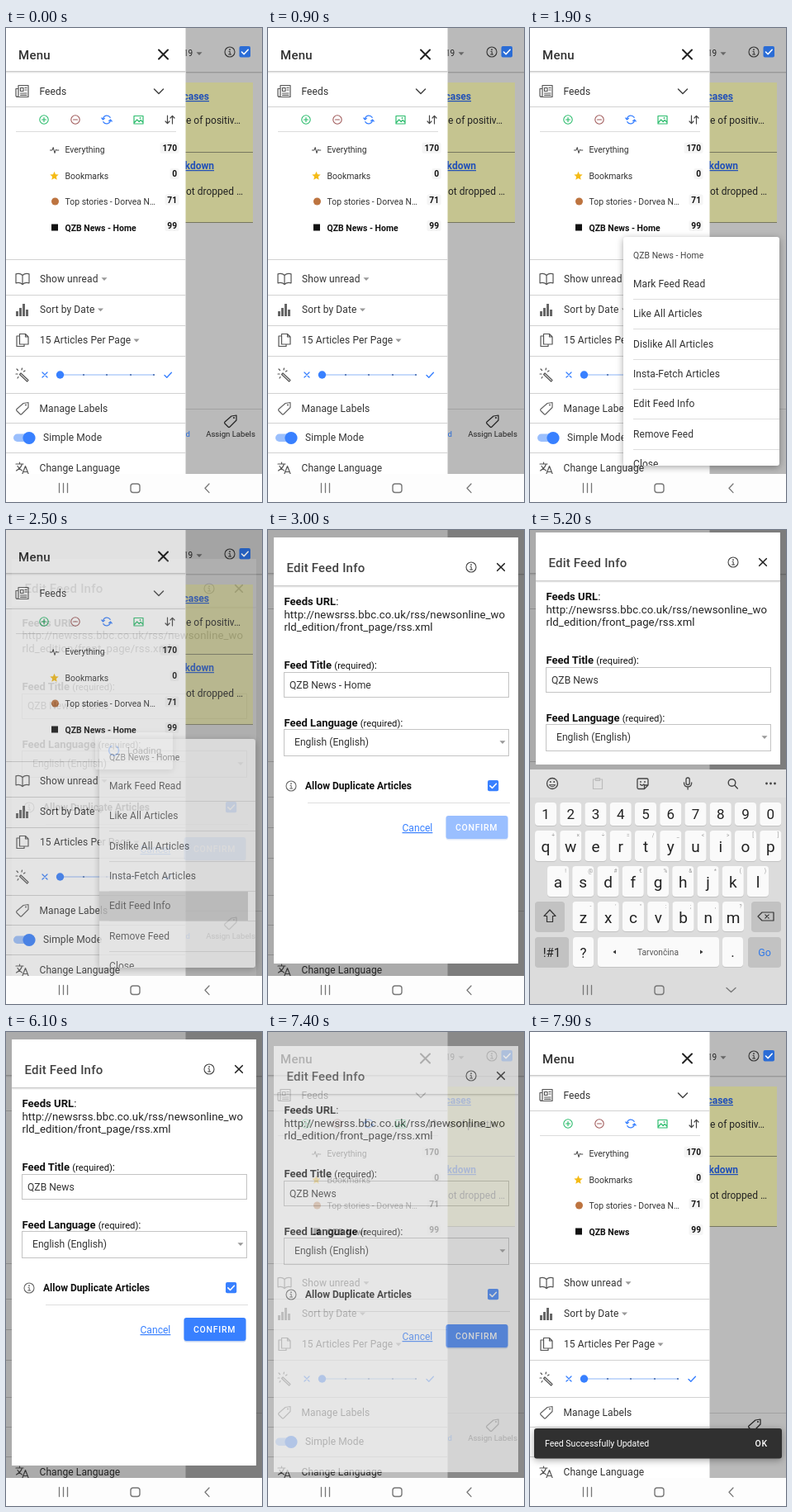
An HTML page that plays this animation: 310x574 px, repeating every 8 s.

```html
<!DOCTYPE html>
<html lang="en">
<head>
<meta charset="utf-8">
<title>Edit feed</title>
<style>
html, body { margin: 0; width: 100%; height: 100%; overflow: hidden; background: #fff; }
svg { display: block; width: 310px; height: 574px; }
text { font-family: Roboto, Arial, sans-serif; white-space: pre; }
#popup, #toast, #loading { filter: drop-shadow(0 2px 4px rgba(0, 0, 0, .35)); }
</style>
</head>
<body>
<svg id="stage" viewBox="0 0 310 574" xmlns="http://www.w3.org/2000/svg"></svg>
<script>
const LONG = 'QZB News - Home', SHORT = 'QZB News';
const BLUE = '#3880ff', INK = '#333';

// Drawing helpers
const text = (x, y, s, size = 12, fill = INK, more = '') =>
  `<text x="${x}" y="${y}" font-size="${size}" fill="${fill}" ${more}>${s}</text>`;
const rect = (x, y, w, h, fill, rx = 0, more = '') =>
  `<rect x="${x}" y="${y}" width="${w}" height="${h}" fill="${fill}" rx="${rx}" ${more}/>`;
const path = (d, stroke = '#555', w = 1.2, fill = 'none') =>
  `<path d="${d}" stroke="${stroke}" stroke-width="${w}" fill="${fill}" stroke-linecap="round" stroke-linejoin="round"/>`;
const dot = (x, y, r, fill, stroke = 'none', w = 1.1) =>
  `<circle cx="${x}" cy="${y}" r="${r}" fill="${fill}" stroke="${stroke}" stroke-width="${w}"/>`;
const rule = (x1, x2, y, c = '#d2d2d2') => rect(x1, y, x2 - x1, 1, c);
const cross = (x, y, r, c = '#222', w = 2) =>
  path(`M${x - r} ${y - r}L${x + r} ${y + r}M${x + r} ${y - r}L${x - r} ${y + r}`, c, w);
const caret = (x, y, c = '#999') => path(`M${x - 3.5} ${y - 1.8}h7l-3.5 3.8z`, 'none', 0, c);
const group = (id, body, more = '') => `<g id="${id}" ${more}>${body}</g>`;
const info = (x, y, c = '#444') => dot(x, y, 6, 'none', c) +
  path(`M${x - 1} ${y - .6}h1.2v3.4M${x - 1.4} ${y + 3}h3`, c, 1) + dot(x, y - 2.8, .9, c);
const checkbox = (x, y, s, c) => rect(x, y, s, s, c, 2) +
  path(`M${x + s * .22} ${y + s * .52}l${s * .2} ${s * .2}l${s * .37} ${-s * .4}`, '#fff', 1.6);
const tag = (x, y, c = '#666') =>
  path(`M${x - 7} ${y + 1}l8-7l6-1l0 6l-8 8q-1 1-2 0l-4-4q-1-1 0-2z`, c) + dot(x + 4, y - 4, 1, c);
const shade = (x, w, y) => rect(x, y, w, 1, '#ccc') + rect(x, y + 1, w, 1, '#e4e4e4') + rect(x, y + 2, w, 1, '#f5f5f5');
const bold = 'font-weight="700"', medium = 'font-weight="500"', mid = 'text-anchor="middle"';

function page() {
  const link = 'font-weight="700" text-decoration="underline"';
  return rect(0, 0, 310, 540, '#bababa') +
    text(215, 34, '19', 10, '#222') + caret(234, 31, '#666') + info(271, 29, '#333') +
    checkbox(282.5, 22, 13.5, '#2a6cd6') +
    rect(200, 53, 110, 1, '#999') + rect(200, 54, 110, 1, '#acacac') +
    rect(200, 66, 99, 170, '#c5c490') + rule(200, 299, 150, '#77775f') + rule(200, 299, 235, '#77775f') +
    text(246, 87, 'cases', 12, '#2150b8', link + ' text-anchor="end"') +
    text(218, 116, 'e of positiv…', 12, '#222') +
    text(252, 171, 'kdown', 12, '#2150b8', link + ' text-anchor="end"') +
    text(218, 202, 'ot dropped …', 12, '#222') +
    rule(200, 310, 461, '#a2a2a2') + tag(272, 476, '#222') +
    text(217.5, 494.5, 'd', 9.6, '#2a6cd6') + text(272, 494.5, 'Assign Labels', 9.6, '#222', mid);
}

function menuIcons() {
  const green = '#2dbd6e', red = '#a05a5a';
  return path('M15 69.5h12v14h-13q-2 0-2-2v-8h3zM15 73v8.5q0 2-1.5 2M17.5 72.5h3.5v4h-3.5zM23 72.5h2M23 75h2M17.5 79h7.5M17.5 81.3h7.5') +
    path('M179.5 74l5.5 5.5l5.5-5.5', '#444', 1.5) +
    dot(46, 111, 5.2, 'none', green) + path('M43.5 111h5M46 108.5v5', green) +
    dot(84, 111, 5.2, 'none', red) + path('M81.5 111h5', red) +
    path('M117.5 110a4.7 4.7 0 0 1 8.7-1.6M126.5 112a4.7 4.7 0 0 1-8.7 1.6M115.8 109l1.7 2l2-1.6M128.2 113l-1.7-2l-2 1.6', BLUE) +
    path('M155 106.5h11v9.5h-11zM155.5 114.5l3.2-3.5l2.5 2.5l2-2l2.5 2.5', green) + dot(162.5, 109, .9, green) +
    path('M195.5 106v9.5M193 113l2.5 2.7l2.5-2.7M201.5 116v-9.5M199 109l2.5-2.7l2.5 2.7', '#444') +
    path('M53.5 148h2.5l1.2-3.5l1.8 7l1.5-4.5l.8 1h2.5', '#444', 1) +
    path('M58.5 173.8l1.5 3.4l3.7.4l-2.8 2.5l.8 3.7l-3.2-1.9l-3.2 1.9l.8-3.7l-2.8-2.5l3.7-.4z', 'none', 0, '#f5bb16') +
    dot(59.5, 210, 4.5, '#bd7440') + rect(55, 237.5, 8, 8, '#111') +
    path('M20 299.5q-3-3-8-1.7v11q5-1.2 8 1.7q3-3 8-1.7v-11q-5-1.2-8 1.7v11') +
    [[12, 6], [16, 10], [20, 15], [24, 8]].map(([x, h]) => rect(x, 349 - h, 3, h, '#666')).join('') +
    path('M16 373h-3v12.5h9v-2.5M16.5 370.5h7l3.5 3.5v9h-10.5zM23.5 370.5v3.5h3.5') +
    path('M18 418l9 8.5M16.5 419.5l9 8.5l1.5-1.5M18 418l-1.5 1.5M13 413l1.5 1.5M19.5 412l-.5 2M12 419h2M23 415l-1.5 1M14 424l1-1.5') +
    tag(20, 460.5) +
    path('M12 528h9M16.5 526v2M19.5 528q-1.5 5-7 8M14 530.5q2 4 5.5 5.5M19.5 541l4-10.5l4 10.5M21 537.5h5');
}

function menu() {
  const feeds = [['Everything', '170', 151.3], ['Bookmarks', '0', 182.6], ['Top stories - Dorvea N…', '71', 214], [LONG, '99', 245.5]];
  const list = feeds.map(([name, n, y], i) => {
    const w = n.length * 6 + 5;
    return rect(209.5 - w, y - 12.5, w, 13, '#f5f5f5', 2) +
      text(71.5, y, name, 10.45, i > 2 ? '#111' : INK, i > 2 ? bold + ' id="feed"' : '') +
      text(207, y - 2.2, n, 10.2, '#111', bold + ' text-anchor="end"');
  }).join('');
  const rows = [['Show unread', 308, 41, 119], ['Sort by Date', 345.3, 41, 114.5], ['15 Articles Per Page', 382.4, 41, 158],
    ['Manage Labels', 464.7, 40.5], ['Simple Mode', 500.3, 45], ['Change Language', 537.3, 40.5]];
  return rect(0, 0, 217.5, 540, '#fff') +
    text(15, 38, 'Menu', 15, '#333', medium + ' letter-spacing=".25"') + cross(190.5, 32, 5.5) + shade(0, 217.5, 52) +
    text(40.5, 81, 'Feeds', 12, INK, 'letter-spacing=".1"') +
    [95, 280, 323, 360, 397, 442, 478, 514].map(y => rule(0, 217.5, y)).join('') +
    rule(12, 206, 125, '#dcdcdc') + menuIcons() + list +
    rows.map(([s, y, x, c]) => text(x, y, s, 12, INK, 'letter-spacing=".1"') + (c ? caret(c, y - 4) : '')).join('') +
    cross(47, 420, 3, BLUE, 1.3) + rule(65, 180, 419.5, '#8db5f8') +
    [94, 122, 151, 179].map(x => dot(x, 420, 1.1, '#4b6fae')).join('') + dot(65.5, 420, 4.7, BLUE) +
    path('M192 420.5l2.8 2.8l5.6-6', BLUE, 1.4) +
    rect(9, 491.5, 25, 9.5, '#9bbffc', 4.7) + dot(28, 496.5, 7.6, BLUE);
}

function popup() {
  const items = ['Mark Feed Read', 'Like All Articles', 'Dislike All Articles', 'Insta-Fetch Articles', 'Edit Feed Info', 'Remove Feed', 'Close'];
  return rect(113, 253, 189, 277, '#fff', 3) +
    group('press', rect(113, 437.5, 180, 36, '#000'), 'opacity="0"') +
    text(125, 279, LONG, 10.4, '#444', 'letter-spacing=".05"') +
    group('items', items.map((s, i) => text(125, 314 + i * 36.35, s, 12, INK, 'letter-spacing=".08"') +
      (i < 6 ? rule(125, 302, Math.round(328 + i * 36.35), '#dedede') : '')).join(''), 'clip-path="url(#popClip)"');
}

function modal() {
  const label = (y, s) => text(19.5, y, `<tspan font-weight="700">${s}</tspan> <tspan font-size="11.2">(required)</tspan>:`, 13, '#111');
  const box = (y, h) => rect(19.5, y, 272, h, '#fff', 0, 'stroke="#c4c4c4"');
  const url = 'letter-spacing=".08"';
  return rect(7, 9, 296, 516, '#fff') +
    text(22.5, 50.5, 'Edit Feed Info', 15, '#424242', medium + ' letter-spacing=".19"') +
    info(246, 45) + cross(282, 45, 4.3, '#222', 1.6) + shade(7, 296, 67) +
    text(19.5, 91, '<tspan font-weight="700">Feeds URL</tspan>:', 13.1, '#111') +
    text(19.5, 106.5, 'http://newsrss.bbc.co.uk/rss/newsonline_wo', 13.2, '#222', url) +
    text(19.5, 122, 'rld_edition/front_page/rss.xml', 13.2, '#222', url) +
    label(168.3, 'Feed Title') + box(172.5, 30) + text(26, 191.5, LONG, 12.15, INK, 'id="title"') +
    label(238, 'Feed Language') + box(241.5, 32) + text(32, 261.2, 'English (English)', 12.15) + caret(284, 257) +
    info(28, 310, '#666') + text(45, 314, 'Allow Duplicate Articles', 12, '#111', bold) + checkbox(266, 303, 13.2, BLUE) +
    rule(48, 293, 330, '#dedede') +
    text(162.5, 365, 'Cancel', 12.1, BLUE, 'text-decoration="underline"') +
    group('confirm', rect(215.5, 347, 75, 28.5, '#c4d3ee', 3) + rect(215.5, 346, 75, 28, BLUE, 3) +
      group('tap', rect(215.5, 346, 75, 28, '#000', 3), 'opacity="0"') +
      text(227, 363.7, 'CONFIRM', 10.5, '#fff', medium + ' letter-spacing=".72"')) +
    group('scroll', rect(300.5, 75, 2, 145, '#ddd', 1)) +
    group('cursor', rect(-.5, 180, 1, 14, '#222')) +
    group('handle', path('M0 194l5.8 6h-11.6z', '#3b7de0', 1, '#3b7de0') + dot(0, 205, 7.4, '#3b7de0'));
}

function keyboard() {
  const key = (x, y, w, h, c = '#fafafa') => rect(x, y + 1, w, h, '#c3c3c3', 4) + rect(x, y, w, h, c, 4);
  const safe = c => c.replace('&', '&amp;').replace('<', '&lt;');
  const row = (chars, hints, x0, y, h) => [...chars].map((c, i) => {
    const x = x0 + i * 30.25;
    return key(x - 13, y, 26, h) + text(x, y + h / 2 + (hints ? 7.8 : 6), c, hints ? 19 : 17, '#222', mid) +
      (hints ? text(x + 9, y + 8, safe(hints[i]), 6.5, '#999', mid) : '');
  }).join('');
  const dark = '#c2c2c2', c = '#444';
  return rect(0, 290, 310, 250, '#dcdcdc') + rect(0, 290, 310, 34, '#e2e2e2') +
    dot(27, 307, 6.5, 'none', c, 1.3) + path('M23.5 309q3.5 4 7 0z', c, 1) + dot(24.8, 305, 1, c) + dot(29.2, 305, 1, c) +
    path('M76.5 302h11v11.5h-11zM79.5 300.5h5v3h-5z', '#bdbdbd') +
    path('M131.5 301h10q1.5 0 1.5 1.5v6.5l-4.5 4.5h-7q-1.5 0-1.5-1.5v-9.5q0-1.5 1.5-1.5zM143 309h-4.5v4.5M133.5 308q2 2.5 4.5 0', c, 1.3) +
    dot(134, 305, .9, c) + dot(139, 305, .9, c) +
    rect(189, 300, 4.2, 8.5, 'none', 2.1, `stroke="${c}" stroke-width="1.3"`) + path('M186.5 306q0 5 4.6 5t4.6-5M191.1 311v3', c, 1.3) +
    dot(244.5, 306, 4.3, 'none', c, 1.4) + path('M247.8 309.3l3.5 3.7', c, 1.4) +
    [286.5, 291.5, 296.5].map(x => dot(x, 307, 1.4, c)).join('') +
    row('1234567890', '', 19, 330, 28) +
    row('qwertyuiop', '+×÷=/_<>[]', 19, 364, 37) +
    row('asdfghjkl', '!@#€%&*()', 34, 407, 37) +
    row('zxcvbnm', `-'":;,?`, 64.5, 450, 36) +
    key(6, 450, 36, 36, dark) + path('M24 460l7 7.5h-3.5v7h-7v-7h-3.5z', '#333') +
    key(268, 450, 36, 36, dark) + group('erase', rect(268, 450, 36, 36, '#a3a3a3', 4), 'opacity="0"') +
    path('M281 463h14v10h-14l-5-5z', '#333') + cross(287, 468, 2.2, '#333', 1.2) +
    key(6, 493, 41, 36, dark) + text(26.5, 517, '!#1', 15, '#222', mid) +
    key(52, 493, 25, 36) + text(64.5, 518, '?', 17, '#222', mid) +
    key(82, 493, 147, 36) + text(155, 515, 'Tarvončina', 10.2, '#555', mid) +
    path('M104 508.5v5l-3.5-2.5zM206 508.5v5l3.5-2.5z', 'none', 0, '#333') +
    key(233, 493, 25, 36) + text(245.5, 517, '.', 17, '#222', mid) +
    key(264, 493, 40, 36, dark) + text(284, 515.5, 'Go', 12.5, '#2f78e8', mid);
}

const loading = () => rect(108, 245, 94, 45, '#f4f4f4', 2) +
  path('M134 262a6 6 0 1 1-6-.5', BLUE, 1.6) + text(147, 271, 'Loading', 11.5, '#444');
const toast = () => rect(5, 480, 300, 36.5, '#303030', 3) +
  text(18, 502, 'Feed Successfully Updated', 10.5, '#fff') +
  text(272.5, 502, 'OK', 10.5, '#fff', medium + ' letter-spacing=".7"');
const nav = () => `<rect id="bar" y="540" width="310" height="34"/>` +
  path('M64.5 551.5v11M69.5 551.5v11M74.5 551.5v11', '#777', 1.3) +
  rect(151, 552, 11, 10.5, 'none', 3, 'stroke="#777" stroke-width="1.4"') +
  group('back', path('M246 552l-5 5.3l5 5.3', '#777', 1.3)) +
  group('down', path('M238 554.5l5.5 5l5.5-5', '#777', 1.3));

document.getElementById('stage').innerHTML =
  `<clipPath id="screen"><rect width="310" height="540"/></clipPath>
   <clipPath id="popClip"><rect x="113" y="253" width="189" height="277"/></clipPath>
   <clipPath id="modalClip"><rect id="modalBox" x="7" y="9" width="296" height="516"/></clipPath>` +
  group('app', page() + menu() + group('popup', popup()) +
    group('backdrop', rect(0, 0, 310, 540, '#000')) + group('loading', loading()) +
    group('modal', group('sheet', modal(), 'clip-path="url(#modalClip)"')) +
    group('toast', toast()) + group('keys', keyboard()), 'clip-path="url(#screen)"') + nav();

const el = {};
document.querySelectorAll('[id]').forEach(e => el[e.id] = e);
const fade = (id, v) => el[id].setAttribute('opacity', v);
const move = (id, v) => el[id].setAttribute('transform', v);
const setText = (id, s) => { if (el[id].textContent !== s) el[id].textContent = s; };
const clamp = (v, a = 0, b = 1) => Math.min(b, Math.max(a, v));
const ease = x => 1 - (1 - x) ** 2.2;

function draw(t) {
  const ramp = (a, b) => clamp((t - a) / (b - a));
  const during = (a, b) => t >= a && t < b ? 1 : 0;

  const pop = ease(ramp(1400, 1650));
  fade('popup', pop * (1 - ramp(2450, 2700)));
  const scale = .8 + .2 * pop;
  move('popup', `translate(113 253) scale(${scale}) translate(-113 -253)`);
  fade('press', .2 * during(2300, 2700));

  const shown = ease(ramp(2450, 2730)) * (1 - ramp(7350, 7600));
  const up = ease(ramp(3250, 3550)) * (1 - ramp(5500, 5750));
  const small = up === 1;
  fade('backdrop', .33 * shown);
  fade('modal', shown ** 2);
  move('modal', `translate(0 ${small ? -6 : 40 * (1 - shown)})`);
  el.modalBox.setAttribute('height', small ? 281 : 516);
  fade('loading', during(2400, 2500) * .8 + during(2500, 2600) * .3 + during(7300, 7400) * .8);

  // Backspace removes " - Home" one letter at a time
  const erased = clamp(Math.floor((t - 4100) / 150) + 1, 0, LONG.length - SHORT.length);
  setText('title', LONG.slice(0, LONG.length - erased));
  const x = 26.5 + el.title.getComputedTextLength();
  move('cursor', `translate(${x} 0)`);
  move('handle', `translate(${x} 0)`);
  const typing = during(4100, 5100);
  fade('cursor', during(3300, 5500) && (typing || Math.floor((t - 3600) / 500) % 2 === 0) ? 1 : 0);
  fade('handle', during(3400, 4100));
  fade('erase', typing);
  fade('scroll', small && t < 4400 ? 1 : 0);
  fade('confirm', erased ? 1 : .5);
  fade('tap', .15 * during(6900, 7300));

  move('keys', `translate(0 ${250 * (1 - up)})`);
  el.bar.setAttribute('fill', up ? '#dcdcdc' : '#fdfdfd');
  fade('back', up ? 0 : 1);
  fade('down', up ? 1 : 0);

  setText('feed', t >= 7400 ? SHORT : LONG);
  fade('toast', ramp(7450, 7700));
}

const STEP = 100, LOOP = 8000;
const start = performance.now();
function tick() {
  const t = (performance.now() - start) % LOOP;
  draw(Math.floor(t / STEP) * STEP);
  requestAnimationFrame(tick);
}
draw(0);
requestAnimationFrame(tick);
</script>
</body>
</html>
```
